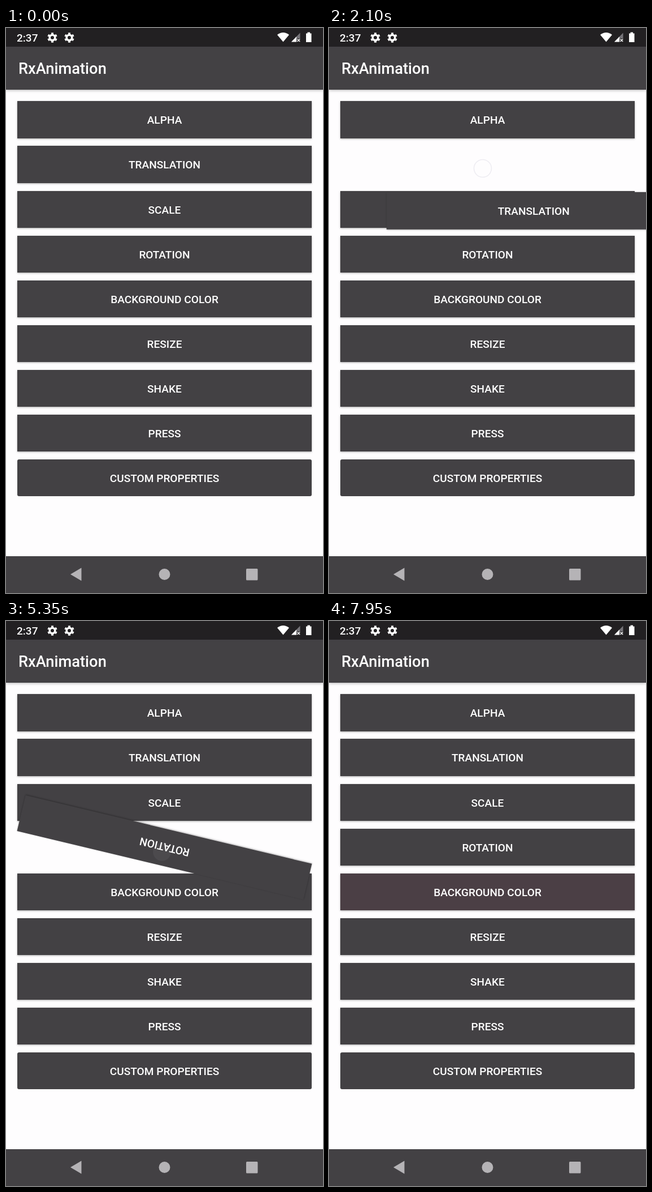
An HTML page for the animation above (8000 ms loop, 561 px wide and 998 px high).

```html
<!DOCTYPE html>
<html lang="en">
<head>
<meta charset="utf-8">
<title>RxAnimation</title>
<style>
html, body { margin: 0; width: 100%; height: 100%; overflow: hidden; background: #fefdfe; }
body { position: relative; font-family: Roboto, sans-serif; font-weight: 500; color: #fff; }
svg { position: absolute; left: 0; top: 0; z-index: 3; }
svg text { fill: #fff; }
.bar { position: absolute; left: 0; width: 561px; top: 0; height: 109px; background: #434144;
  box-shadow: 0 1px 5px rgba(0, 0, 0, .3); z-index: 2; }
.btn { position: absolute; left: 20px; width: 521px; height: 65.4px; line-height: 67px;
  font-size: 19.1px; text-align: center; white-space: nowrap; background: #434144;
  box-shadow: 0 1px 3px rgba(0, 0, 0, .32); }
.btn:last-child { border-radius: 3px; box-shadow: none; }
</style>
</head>
<body>
<div class="bar"></div>
<svg width="561" height="998" viewBox="0 0 561 998">
  <defs>
    <g id="gear" fill="none" stroke="#fff">
      <circle r="4.8" stroke-width="3.6"/>
      <circle r="7.2" stroke-width="3.2" pathLength="6" stroke-dasharray=".5 .5" stroke-dashoffset="-.25"/>
    </g>
  </defs>
  <rect width="561" height="33" fill="#222022"/>
  <text x="19" y="23.5" font-size="19">2:37</text>
  <use href="#gear" x="82" y="17"/>
  <use href="#gear" x="112" y="17"/>
  <path d="M480 12Q490.500 4 501 12L490.500 24.500Z" fill="#fff"/>
  <path d="M505 24.500L520.500 8.500V24.500Z" fill="#77757a"/>
  <path d="M505 24.500L514 15.200V24.500Z" fill="#fff"/>
  <path d="M514.500 18.500h6v6.500h-6z" fill="#222022"/>
  <path d="M515.500 19.500l4.500 4.500m0-4.500l-4.500 4.500" stroke="#fff" stroke-width="1.500"/>
  <path d="M531 9.500h2.500V7.500h4.500v2h2.500V25H531Z" fill="#fff"/>
  <text x="22" y="81" font-size="27.3">RxAnimation</text>
  <rect y="933" width="561" height="65" fill="#434144"/>
  <g fill="#b5b3b6">
    <path d="M114 965L133.500 953.500V976.500Z"/>
    <circle cx="280.500" cy="965" r="10"/>
    <rect x="425" y="955" width="20.500" height="20.500" rx="1.500"/>
  </g>
  <circle id="dot" r="15.500" fill="rgba(255,255,255,.25)" stroke="rgba(130,125,160,.2)" stroke-width="1.500"/>
</svg>
<script>
const LOOP = 8000, STEP = 50, PRESS = 50, RELEASE = 470;
const labels = ['ALPHA', 'TRANSLATION', 'SCALE', 'ROTATION', 'BACKGROUND COLOR',
  'RESIZE', 'SHAKE', 'PRESS', 'CUSTOM PROPERTIES'];
const buttons = labels.map((label, i) => {
  const el = document.createElement('div');
  el.className = 'btn';
  el.textContent = label;
  el.style.top = 129.4 + i * 79.05 + 'px';
  return document.body.appendChild(el);
});
const dot = document.getElementById('dot');

const base = [67, 65, 68], accent = [216, 27, 96];
const mix = k => `rgb(${base.map((c, i) => c + (accent[i] - c) * k)})`;

// Each button runs out and back; k goes 0 -> 1 -> 0.
const acts = [
  { start: 397, span: 704, x: 276, y: 168, draw: (s, k) => s.opacity = 1 - k },
  { start: 1946, span: 704, x: 272, y: 248, draw: (s, k) => s.transform = `translate(${720.6 * k}px, ${720.6 * k}px)` },
  { start: 3525, span: 718, x: 275, y: 328, draw: (s, k) => s.transform = `scale(${1 - k})` },
  { start: 4976, span: 714, x: 276, y: 408, draw: (s, k) => s.transform = `rotate(${360 * k}deg)` },
  { start: 6612, span: 722, x: 278, y: 487, draw: (s, k) => s.background = mix(k) }
];

const clamp = v => Math.min(1, Math.max(0, v));
const ease = f => (1 - Math.cos(Math.PI * f)) / 2;

function render(t) {
  let glow = 0;
  acts.forEach((a, i) => {
    const age = t - a.start, style = buttons[i].style;
    a.draw(style, ease(clamp(1 - Math.abs(age / a.span - 1))));
    const held = age >= -PRESS && age < RELEASE;
    style.zIndex = held ? 1 : 0;
    if (held) {
      glow = clamp(1 - age / RELEASE);
      dot.setAttribute('cx', a.x);
      dot.setAttribute('cy', a.y);
    }
  });
  dot.setAttribute('opacity', glow);
}

function tick() {
  const t = performance.now() % LOOP;
  render(t - t % STEP);
  requestAnimationFrame(tick);
}
tick();
</script>
</body>
</html>
```
